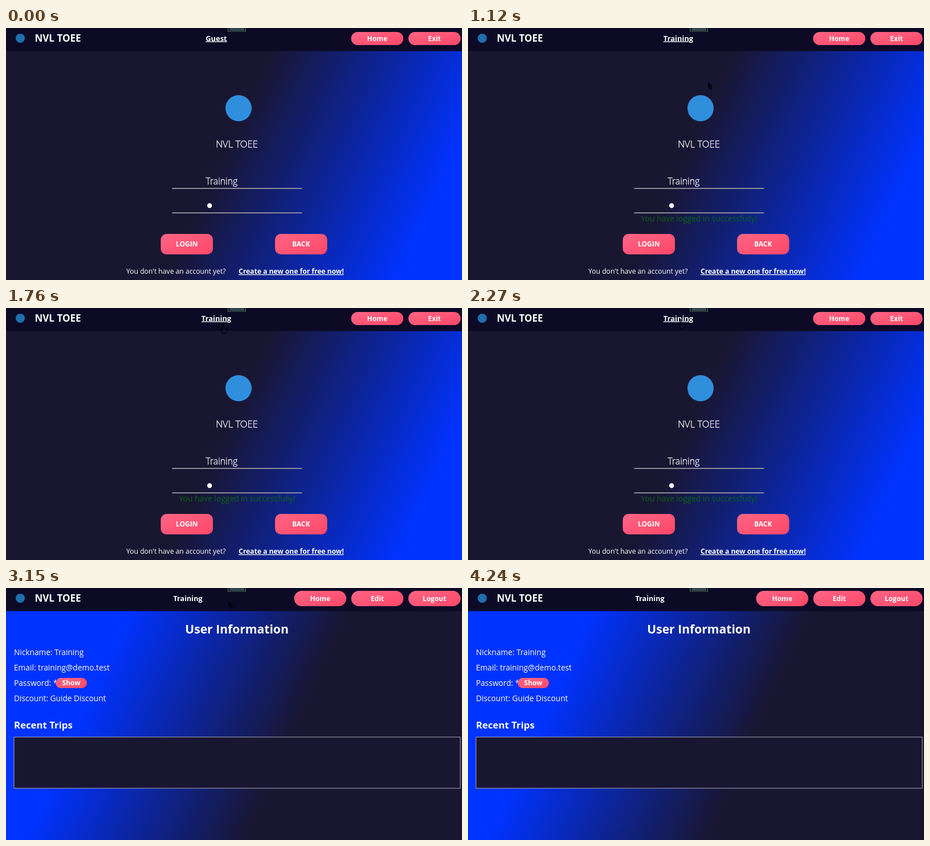
These frames come from a looping animation (800 by 443 pixels, 4.33 s). An HTML page:

```html
<!DOCTYPE html>
<html lang="en">
<head>
<meta charset="utf-8">
<title>Login walkthrough</title>
<style>
  html, body { margin: 0; width: 100%; height: 100%; overflow: hidden; background: #191632; }
  svg { display: block; width: 800px; height: 443px; }
  text { font-family: "Open Sans", "Noto Sans", sans-serif; fill: #fff; white-space: pre; }
  .light { font-weight: 300; stroke: #fff; stroke-width: .3px; }
</style>
</head>
<body>
<svg id="stage" viewBox="0 0 800 443"></svg>
<script>
const LOOP = 4330, LOGIN_AT = 590, PROFILE_AT = 2340, TAB_BACK_AT = 3000, CURSOR_AT = 60;
const BRAND = 'NVL TOEE', USER = 'Training', MAIL = 'training@demo.test';

const text = (x, y, size, str, { weight = 400, anchor = 'start', extra = '' } = {}) =>
  `<text x="${x}" y="${y}" font-size="${size}" font-weight="${weight}" text-anchor="${anchor}" ${extra}>${str}</text>`;
const mid = (x, y, size, str, weight, extra) => text(x, y, size, str, { weight, anchor: 'middle', extra });
const rect = (x, y, w, h, fill, extra = '') =>
  `<rect x="${x}" y="${y}" width="${w}" height="${h}" fill="${fill}" ${extra}/>`;
const button = (x, y, w, h, r, label) =>
  rect(x, y, w, h, 'url(#pink)', `rx="${r}"`) + mid(x + w / 2, y + h / 2 + 4, 12, label, 700);
const gradient = (id, x1, y1, x2, y2, from, to) =>
  `<linearGradient id="${id}" gradientUnits="userSpaceOnUse" x1="${x1}" y1="${y1}" x2="${x2}" y2="${y2}">
    <stop stop-color="${from}"/><stop offset="1" stop-color="${to}"/></linearGradient>`;
const page = fill => rect(0, 0, 800, 443, `url(#${fill})`) + rect(0, 0, 800, 40.6, '#0d0a26');
const underline = 'text-decoration="underline"';

const login = page('toBlue') +
  mid(369, 22.5, 12.9, 'Guest', 700, `id="who" ${underline}`) +
  button(605.5, 7, 91.5, 23, 11.5, 'Home') +
  button(706, 7, 91.5, 23, 11.5, 'Exit') +
  '<circle cx="408" cy="141" r="23" fill="#2f8fdc"/>' +
  mid(405, 210, 16.6, BRAND, 300, 'class="light"') +
  text(350.5, 275, 15.8, USER, { extra: 'class="light"' }) +
  '<circle cx="357.2" cy="312.3" r="4.2" fill="#fff"/>' +
  rect(291.5, 281, 228, 2, '#8c8b99') +
  rect(291.5, 324, 228, 2, '#8c8b99') +
  mid(405.5, 340, 13.8, 'You have logged in successfully!', 400, 'id="message" style="fill:#0c6216"') +
  button(271.5, 362, 91.5, 36, 10, 'LOGIN') +
  button(472, 362, 91.5, 36, 10, 'BACK') +
  text(211, 432, 12.15, "You don't have an account yet?") +
  text(408, 432, 12.1, 'Create a new one for free now!', { weight: 700, extra: underline });

const profile = page('toDark') +
  mid(319, 22.5, 12.6, USER, 700) +
  ['Home', 'Edit', 'Logout'].map((label, i) => button(505.5 + i * 100.2, 5, 91.5, 27, 13.5, label)).join('') +
  mid(405, 80, 21.1, 'User Information', 700) +
  [`Nickname: ${USER}`, `Email: ${MAIL}`, 'Password: *', 'Discount: Guide Discount']
    .map((line, i) => text(14, 118 + i * 27, 13.7, line)).join('') +
  button(87, 158, 55, 18, 9, 'Show') +
  text(14, 247, 16.8, 'Recent Trips', { weight: 700 }) +
  rect(14, 262, 783, 90, '#191632', 'stroke="#a9a8b6" stroke-width="1"');

const $ = id => document.getElementById(id);
$('stage').innerHTML = `<defs>
  ${gradient('toBlue', 468, 41, 802, 198, '#191632', '#0033ff')}
  ${gradient('toDark', 215, 41, 535, 185, '#0033ff', '#191632')}
  <linearGradient id="pink" x2="1" y2="1"><stop stop-color="#ff6584"/><stop offset="1" stop-color="#ff4768"/></linearGradient>
  </defs>
  <g id="login">${login}</g>
  <g id="profile">${profile}</g>
  <circle cx="25" cy="18" r="8" fill="#1d6fae"/>
  ${text(50.5, 24, 17, BRAND, { weight: 700 })}
  <g id="tab">${rect(389.5, -2, 31, 8, '#182a30', 'stroke="#48614f"')}
    <path d="M394 1.5h23M394 3.5h23" stroke="#8496a0" stroke-width=".8" stroke-dasharray="2 1"/></g>
  <g id="cursor" stroke="#000" stroke-width=".7" stroke-linejoin="round">
    <path id="arrow" fill="#05040c" d="M0 0V11L2.4 8.8L4.2 13L5.8 12.2L4.1 8.2H7.4Z"/>
    <path id="hand" fill="none" stroke-width="1.1" d="M-1 1Q0-1 1 1V6L3 5.5L4 6.5L6 6.2L7 7.4L8.5 7.5V11L7 16H0L-4 10Q-4 8-2 9L-1 10Z"/>
  </g>`;

// Pointer stops: time, x, y
const stops = [
  [0, 440, 345], [CURSOR_AT, 440, 345], [480, 360, 388], [700, 360, 388], [1140, 422, 94],
  [1560, 381, 30], [1800, 380, 28], [2270, 373, 20], [2500, 372, 20], [3100, 391, 23],
  [3360, 391, 23], [3900, 520, 320], [4240, 812, 412], [LOOP, 812, 412]
];

function pointerAt(t) {
  const i = stops.findIndex(s => s[0] > t);
  const [t0, x0, y0] = stops[i - 1], [t1, x1, y1] = stops[i];
  const u = (t - t0) / (t1 - t0), e = u * u * (3 - 2 * u);
  return [x0 + (x1 - x0) * e, y0 + (y1 - y0) * e];
}

const show = (id, on) => { $(id).style.display = on ? '' : 'none'; };

function draw(now) {
  const t = now % LOOP, onLogin = t < PROFILE_AT, loggedIn = t >= LOGIN_AT;
  const [x, y] = pointerAt(t);
  const overLogin = x > 271 && x < 363 && y > 362 && y < 398;
  const overName = x > 344 && x < 394 && y < 32;
  const hand = onLogin && (overLogin || overName);

  show('login', onLogin);
  show('profile', !onLogin);
  show('message', loggedIn);
  show('tab', onLogin || t >= TAB_BACK_AT);
  show('cursor', t >= CURSOR_AT);
  show('arrow', !hand);
  show('hand', hand);
  $('who').textContent = loggedIn ? USER : 'Guest';
  $('cursor').setAttribute('transform', `translate(${x} ${y})`);
  requestAnimationFrame(() => draw(performance.now()));
}
draw(performance.now());
</script>
</body>
</html>
```
